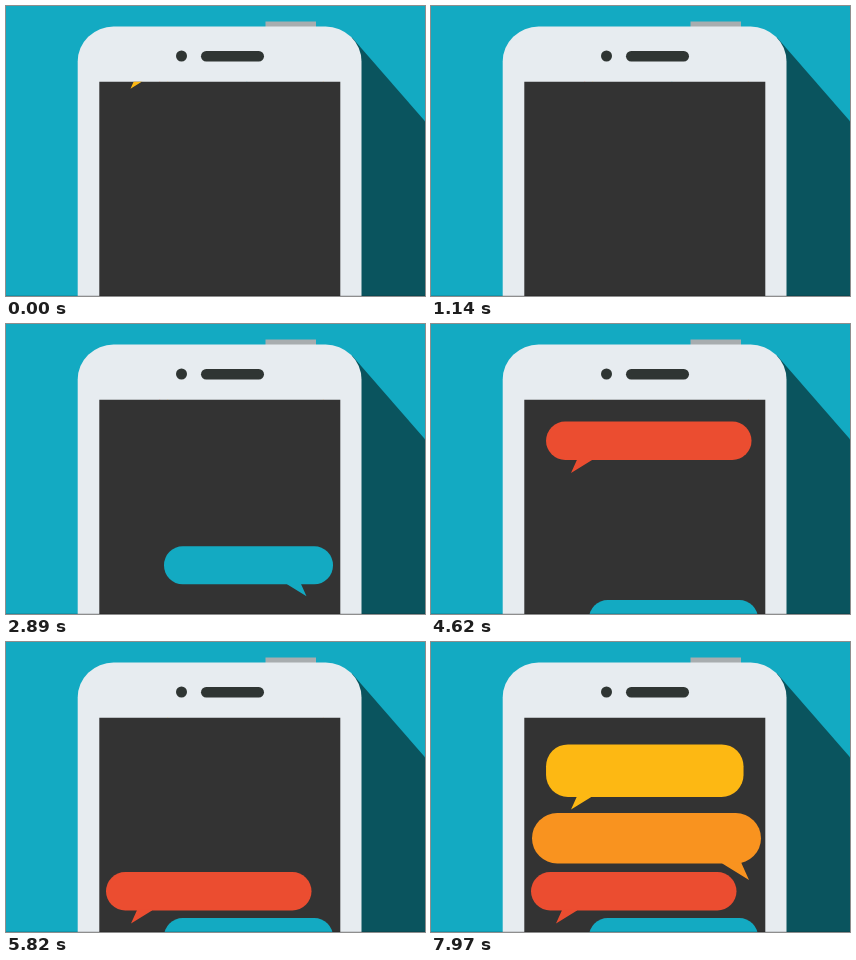
An HTML page for the animation above (8000 ms loop, 419 by 290 pixels).

```html
<!DOCTYPE html>
<html lang="en">
<head>
<meta charset="utf-8">
<title>Falling messages</title>
<style>
  html, body { margin: 0; width: 100%; height: 100%; overflow: hidden; background: #13aac2; }
  svg { display: block; width: 100%; height: 100%; }
</style>
</head>
<body>
<svg viewBox="0 0 419 290">
  <clipPath id="screen"><path d="M93.300 75.700H334.300V290H93.300Z"/></clipPath>
  <path d="M346 31.500L419 115.200V290H346Z" fill="#0a545e"/>
  <rect x="259.500" y="15.500" width="50.500" height="8" fill="#a8adaf"/>
  <rect x="71.700" y="20.500" width="283.800" height="320" rx="36" ry="35" fill="#e7ecf0"/>
  <circle cx="175.500" cy="50" r="5.500" fill="#2f3533"/>
  <rect x="195" y="45" width="63" height="10.500" rx="5.200" fill="#2f3533"/>
  <path d="M93.300 75.700H334.300V290H93.300Z" fill="#333"/>
  <g id="chat" clip-path="url(#screen)"></g>
  <path d="M0 289H419V290H0Z" opacity=".12"/>
</svg>
<script>
const LOOP = 8000, TOP = 76, LEFT = 99, RIGHT = 333;
const YELLOW = '#fdb813', TEAL = '#13aac2', RED = '#eb4d30', ORANGE = '#f9931f';

const chat = document.getElementById('chat');
const began = performance.now();

function add(parent, tag, attrs) {
  const el = document.createElementNS('http://www.w3.org/2000/svg', tag);
  for (const name in attrs) el.setAttribute(name, attrs[name]);
  return parent.appendChild(el);
}

// The tail hangs below the body; a negative tip is measured from the right edge.
function bubble(fill, w, h, tip, depth, motion) {
  const el = add(chat, 'g', { fill });
  const side = Math.sign(tip), x = tip < 0 ? w + tip : tip;
  const near = x + side * depth * 0.45, far = x + side * depth * 1.62;
  add(el, 'rect', { width: w, height: h, rx: Math.min(h / 2, w / 9) });
  add(el, 'path', { d: `M${near} ${h - 1}V${h}L${x} ${h + depth}L${far} ${h}V${h - 1}Z` });
  return { el, hidden: TOP - h - depth, ...motion };
}

// Straight fall from above the screen to the floor.
const fall = (x, floor, enter, land) =>
  ({ from: x, to: x, row: floor, floor, enter, slide: land, drop: land, land });

// Fall to a row, slide sideways along it, then drop to the floor.
const steer = (from, to, row, floor, enter, slide, drop, land) =>
  ({ from, to, row, floor, enter, slide, drop, land });

const bubbles = [
  bubble(YELLOW, 235, 39, 26.5, 13, fall(98, 292, -28, 1140)),
  bubble(TEAL, 169, 38, -26.5, 12, steer(LEFT, 158, 121, 276, 1260, 1940, 2440, 3130)),
  bubble(RED, 205.5, 38.5, 25, 13, steer(RIGHT - 205, 100, 97.5, 230, 4040, 4380, 4900, 5820)),
  bubble(ORANGE, 229, 50.5, -12, 16.5, fall(101, 171, 6370, 7160)),
  bubble(YELLOW, 197.5, 52.5, 25, 12.5, steer(RIGHT - 197, 100, 102.4, 230, 7200, 7610, 8230, 9000))
];

// Progress of t from a to b, held at 0 and 1 outside.
const part = (t, a, b) => Math.min(1, Math.max(0, (t - a) / (b - a || 1)));

function draw(now) {
  const t = Math.max(0, now - began) % LOOP;
  for (const b of bubbles) {
    const x = b.from + (b.to - b.from) * part(t, b.slide, b.drop);
    const y = b.hidden + (b.row - b.hidden) * part(t, b.enter, b.slide)
      + (b.floor - b.row) * part(t, b.drop, b.land);
    b.el.setAttribute('transform', `translate(${x} ${y})`);
  }
  requestAnimationFrame(draw);
}
draw(began);
</script>
</body>
</html>
```
